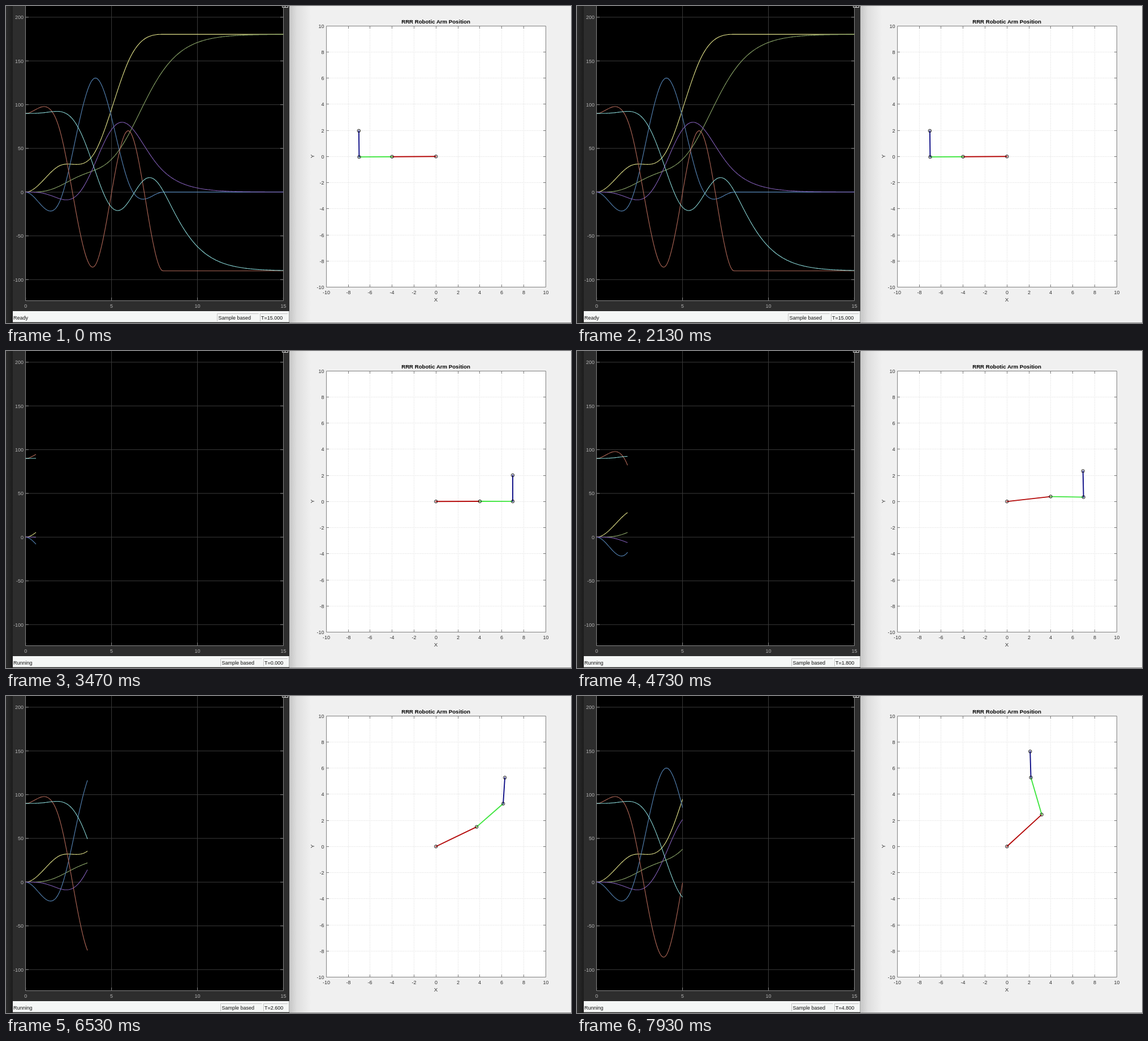
These frames come from a looping animation (999 by 561 pixels, 8 s). An HTML page:

```html
<!DOCTYPE html>
<html lang="en">
<head>
<meta charset="utf-8">
<title>RRR Robotic Arm Position</title>
<style>
  html, body { margin: 0; width: 100%; height: 100%; overflow: hidden; background: #f0f0f0; }
  svg { display: block; width: 100%; height: 100%; }
  text { font: 9px "Liberation Sans", Arial, sans-serif; }
  .tick { fill: #b4b4b4; }
  .label { fill: #333; }
  .status { fill: #111; }
  .curve { fill: none; stroke-width: 1.1; stroke-linejoin: round; }
  .link { stroke-width: 1.9; stroke-linecap: round; }
  .joint { fill: none; stroke: #111; stroke-width: 1; }
  .field { fill: none; stroke: #c4c4c4; }
</style>
</head>
<body>
<svg id="stage" viewBox="0 0 999 561">
  <defs>
    <linearGradient id="shade">
      <stop offset="0" stop-color="#c6c6c6"/>
      <stop offset=".35" stop-color="#dedede"/>
      <stop offset="1" stop-color="#f0f0f0"/>
    </linearGradient>
    <linearGradient id="edge">
      <stop offset="0" stop-color="#2c2c2c"/>
      <stop offset="1" stop-color="#1c1c1c"/>
    </linearGradient>
  </defs>
  <rect width="999" height="561" fill="#f0f0f0"/>
  <rect x="501" width="38" height="561" fill="url(#shade)"/>
  <rect width="12" height="561" fill="url(#edge)"/>
  <rect x="12" width="489" height="560" fill="#2d2d2d"/>
  <rect x="35" y="-2" width="455" height="523" fill="#000"/>
  <rect x="12" y="540" width="488.6" height="19.6" fill="#f5f7f6"/>
  <rect y="560" width="501" height="1" fill="#222"/>
  <rect x="501" y="560" width="498" height="1" fill="#8a8a8a"/>
  <path d="M488.5 0V2.5H498.5V0M493.5 0V2" fill="none" stroke="#ddd"/>
  <rect x="566.5" y="35.5" width="388" height="462" fill="#fff"/>
</svg>
<script>
const stage = document.getElementById('stage');
const LOOP = 8, CLEAR_AT = 2.83, START_AT = 2.9, END = 15, DT = 0.01;

function add(tag, attrs, text) {
  const el = document.createElementNS('http://www.w3.org/2000/svg', tag);
  for (const key in attrs) el.setAttribute(key, attrs[key]);
  if (text !== undefined) el.textContent = text;
  return stage.appendChild(el);
}
const line = (d, stroke, extra) => add('path', { d, stroke, fill: 'none', ...extra });
const label = (x, y, text, cls, anchor = 'middle', extra) =>
  add('text', { x, y, class: cls, 'text-anchor': anchor, ...extra }, text);

const scopeX = t => 34.7 + t * 30.38;
const scopeY = v => 329.4 - v * 1.548;
const armX = x => 760.2 + x * 19.4;
const armY = y => 266.3 - y * 23.13;
const crisp = v => Math.floor(v) + 0.5;

// Scope axes
for (let v = -100; v <= 200; v += 50) {
  const y = scopeY(v);
  line(`M35 ${y}H490`, '#3a3a3a');
  line(`M35 ${y}h5M490 ${y}h-5`, '#888');
  label(31, y + 3.4, v, 'tick', 'end');
}
for (let t = 0; t <= 15; t += 5) {
  const x = scopeX(t);
  if (t % 15) line(`M${x} 0V521`, '#3a3a3a');
  line(`M${x} 521v-5`, '#888');
  label(x, 534, t, 'tick');
}
line('M34.5 0V521.5H490.5V0', '#858585');

// Arm axes
for (let n = -10; n <= 10; n += 2) {
  const x = crisp(armX(n)), y = crisp(armY(n));
  if (Math.abs(n) < 10) {
    line(`M${x} 36V497M567 ${y}H954`, '#e9e9e9', { 'stroke-dasharray': '2 1' });
    line(`M${x} 497v-4M${x} 36v4M567 ${y}h4M954 ${y}h-4`, '#777');
  }
  label(x, 510, n, 'label');
  label(562.5, y + 3.2, n, 'label', 'end');
}
line('M566.5 35.5H954.5V497.5H566.5Z', '#808080');
label(760, 31, 'RRR Robotic Arm Position', '', 'middle', { style: 'font-size:9.63px;font-weight:bold' });
label(760, 522.5, 'X', 'label', 'middle', { style: 'font-size:9.8px' });
label(0, 0, 'Y', 'label', 'middle', { style: 'font-size:9.8px', transform: 'translate(544.5 266) rotate(-90)' });

// Clamped cubic spline through five waypoints spaced 2 s apart
function spline(p) {
  const v4 = (1.5 * (p[3] - p[1]) - 0.375 * (p[4] - p[0])) / 3.5;
  const slopes = [0, (1.5 * (p[2] - p[0]) - v4) / 4, v4, (1.5 * (p[4] - p[2]) - v4) / 4, 0];
  return t => {
    if (t >= 8) return p[4];
    const i = Math.floor(t / 2), s = t / 2 - i, r = 1 - s;
    return r * r * (1 + 2 * s) * p[i] + s * s * (3 - 2 * s) * p[i + 1]
      + 2 * s * r * (r * slopes[i] - s * slopes[i + 1]);
  };
}

// Critically damped joint following its reference
function follow(ref) {
  let y = ref(0), v = 0;
  const out = [];
  for (let i = 0; i <= END / DT; i++) {
    out.push(y);
    const a = ref((i + 0.5) * DT) - y - 2 * v;
    y += v * DT + a * DT * DT / 2;
    v += a * DT * (1 - DT);
  }
  return out;
}

const joints = [
  { points: [0, 30.4, 44.7, 150.4, 180.4], refColor: '#e6e68c', color: '#8aa468' },
  { points: [0, -10, 130.2, 10.3, 0], refColor: '#5686b8', color: '#7f5cb4' },
  { points: [90, 70.2, -84.8, 70.1, -90], refColor: '#b06858', color: '#86d2d2' }
];
const curves = [];
for (const joint of joints) {
  const ref = spline(joint.points);
  joint.angle = follow(ref);
  for (const [stroke, value] of [
    [joint.refColor, i => ref(i * DT)],
    [joint.color, i => joint.angle[i]]
  ]) {
    const points = [];
    for (let i = 0; i <= END / DT; i += 5)
      points.push(scopeX(i * DT).toFixed(2) + ' ' + scopeY(value(i)).toFixed(2));
    curves.push({ points, el: add('path', { class: 'curve', stroke }) });
  }
}

const lengths = [4, 3, 2];
const links = ['#b40808', '#3fe63f', '#0c0c86'].map(stroke => add('path', { class: 'link', stroke }));
const dots = [0, 1, 2, 3].map(() => add('circle', { class: 'joint', r: 2.7 }));

const state = label(13, 555, '', 'status', 'start');
const modeBox = add('path', { class: 'field' });
const mode = label(0, 555, 'Sample based', 'status', 'start');
const clock = label(0, 555, '', 'status', 'start');

function drawArm(t) {
  const i = Math.round(t / DT);
  let x = 0, y = 0, angle = 0;
  const place = k => {
    dots[k].setAttribute('cx', armX(x));
    dots[k].setAttribute('cy', armY(y));
  };
  place(0);
  joints.forEach((joint, k) => {
    const from = `M${armX(x)} ${armY(y)}`;
    angle += joint.angle[i] * Math.PI / 180;
    x += lengths[k] * Math.cos(angle);
    y += lengths[k] * Math.sin(angle);
    links[k].setAttribute('d', `${from}L${armX(x)} ${armY(y)}`);
    place(k + 1);
  });
}

function drawStatus(running, time) {
  const shift = running ? 6 : 0;
  state.textContent = running ? 'Running' : 'Ready';
  clock.textContent = 'T=' + time.toFixed(3);
  mode.setAttribute('x', 375.5 + shift);
  clock.setAttribute('x', 451 + shift);
  modeBox.setAttribute('d',
    `M${373.5 + shift} 558V544.5H${446.5 + shift}M${449.5 + shift} 558V544.5H498`);
}

const clockSteps = [0, 0.7, 1.8, 2.6, 3.7, 4.8];

function frame(now) {
  const t = now / 1000 % LOOP;
  const running = t >= CLEAR_AT;
  const sim = running ? Math.max(0, Math.round((t - START_AT) * 10 + 1e-6) / 10) : END;
  const count = Math.round(sim / DT / 5) + 1;
  for (const { el, points } of curves)
    el.setAttribute('d', 'M' + points.slice(0, count).join('L'));
  drawArm(sim);
  drawStatus(running, running ? clockSteps.filter(s => s <= sim).pop() : END);
  requestAnimationFrame(frame);
}
frame(0);
</script>
</body>
</html>
```
